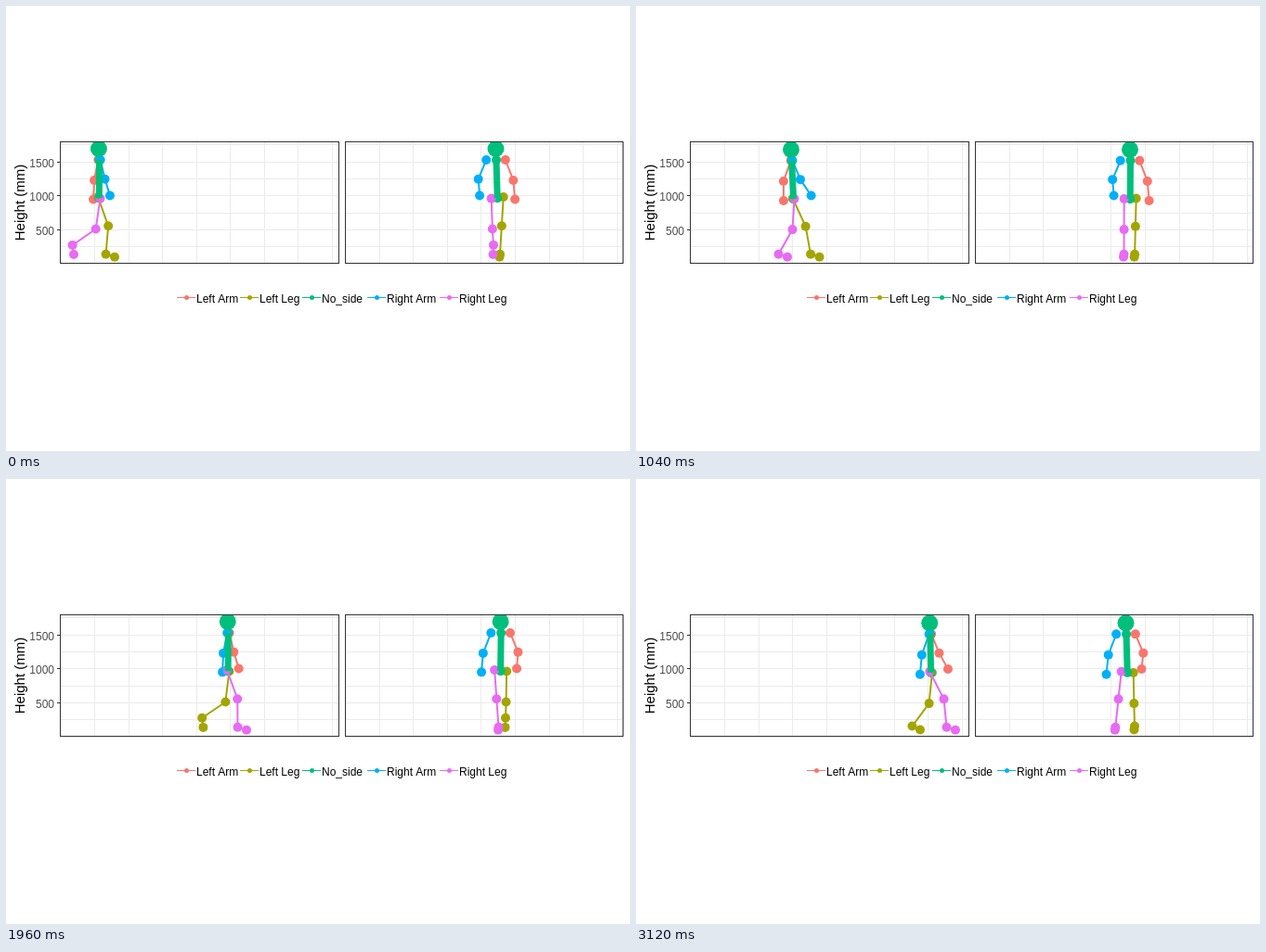
Recreate the animation shown at these times as an HTML page with a canvas. Size 672 px wide and 480 px high, loop 3140 ms.

```html
<!DOCTYPE html>
<html>
<head>
<meta charset="utf-8">
<style>
html, body { margin: 0; width: 100%; height: 100%; overflow: hidden; background: #fff; }
canvas { display: block; }
</style>
</head>
<body>
<canvas id="stage" width="672" height="480"></canvas>
<script>
const ctx = document.getElementById('stage').getContext('2d');
const LOOP = 3140, STEP = 20, STRIDE = 1305, TAU = 2 * Math.PI;
const THIGH = 33.2, SHANK = 30.5;
const RED = '#F8766D', OLIVE = '#A3A500', GREEN = '#00BF7D', BLUE = '#00B0F6', PINK = '#E76BF3';

// Successive footfalls of each foot: [side x, front x].
const FOOTFALLS = {
  left: [[25, 532], [117, 532], [212, 538], [306, 537]],
  right: [[73, 525], [163, 525.5], [259, 530.5], [346, 516]]
};

const wave = (phase, peak = 0) => Math.cos(TAU * (phase - peak));
const mix = (a, b, u) => a + (b - a) * u;

function line(points, color, width) {
  ctx.strokeStyle = color;
  ctx.lineWidth = width;
  ctx.beginPath();
  points.forEach(([x, y]) => ctx.lineTo(x, y));
  ctx.stroke();
}

function dot([x, y], r, color) {
  ctx.fillStyle = color;
  ctx.beginPath();
  ctx.arc(x, y, r, 0, TAU);
  ctx.fill();
}

function text(str, x, y, color = '#000', align = 'left', size = 12) {
  ctx.font = size + 'px "Liberation Sans", Arial, sans-serif';
  ctx.fillStyle = color;
  ctx.textAlign = align;
  ctx.fillText(str, x, y);
}

// Steady walk with a slow drift, two bobs per stride and a slight twist.
function trunk(t) {
  const phase = t / STRIDE, drift = TAU * t / LOOP;
  const hip = 100.3 + .0696 * t - 3.5 * Math.sin(drift);
  return {
    hip,
    head: hip - 1.6 + 1.2 * wave(2 * phase),
    hipFront: 531.2 - 2 * Math.cos(drift),
    headFront: 530.5 - 3 * Math.cos(drift),
    drop: 1 - 1.4 * wave(2 * phase, .25),
    twist: 1.3 * wave(phase, .43)
  };
}

// Knee between hip and ankle, bent forwards.
function bend([hx, hy], [ax, ay]) {
  const dx = ax - hx, dy = ay - hy, d = Math.hypot(dx, dy);
  const along = (d * d + THIGH ** 2 - SHANK ** 2) / (2 * d);
  const out = Math.sqrt(Math.max(0, THIGH ** 2 - along ** 2));
  return [hx + (dx * along + dy * out) / d, hy + (dy * along - dx * out) / d];
}

// Joints of one side as [side x, front x, y]; each stride starts at toe-off.
function limbs(t, side) {
  const { hip, head, hipFront, headFront, drop, twist } = trunk(t);
  const left = side === 'left', dir = left ? 1 : -1;
  const phase = t / STRIDE - (left ? .5 : 0);
  const turn = Math.floor(phase), p = phase - turn;

  const shoulder = head + .6 + dir * twist;
  const handDx = 4.5 + 14.5 * wave(p, .84) - 2 * wave(2 * p);
  const arm = [
    [shoulder, headFront + dir * 10.3, 165 + drop],
    [shoulder + .3 + 8.5 * wave(p, .84), headFront + dir * 18.8, 186.3 + drop - wave(p, .86)],
    [shoulder + handDx, headFront + dir * (19 - 2 * wave(p, .9)), 205.5 + drop - 3 * wave(p, .86)]
  ];

  const i = turn + (left ? 1 : 0), from = FOOTFALLS[side][i], to = FOOTFALLS[side][i + 1];
  const swing = Math.sin(Math.PI / 2 * Math.min(1, p / .45)) ** 1.1;
  const heelLift = Math.exp(-((((p + .455) % 1 - .5) / .1) ** 2));
  const toeX = mix(from[0], to[0], swing), footFront = mix(from[1], to[1], swing);
  const ankle = [toeX - 9.5 + 10 * heelLift, 267.7 - 12 * heelLift];
  const joint = [hip + dir * twist, 205.6 + 1.2 * drop + .8 * wave(p)];
  const knee = bend(joint, ankle), jointFront = hipFront + dir * 6.5;
  return {
    arm,
    leg: [
      [joint[0], jointFront, joint[1]],
      [knee[0], (jointFront + footFront) / 2, knee[1]],
      [ankle[0], footFront, ankle[1]],
      [toeX, footFront - .5, 270.8 - 3.5 * heelLift]
    ]
  };
}

function figure(t, front) {
  const { hip, head, hipFront, headFront, drop } = trunk(t);
  const view = joints => joints.map(([s, f, y]) => [front ? f : s, y]);
  const left = limbs(t, 'left'), right = limbs(t, 'right');
  const [skull, ...torso] = view([
    [head, headFront, 153 + drop],
    [head + .6, headFront + .5, 165 + drop],
    [hip, hipFront, 206 + 1.2 * drop]
  ]);
  const parts = [
    [view(left.arm), RED, 2], [view(left.leg), OLIVE, 2], [torso, GREEN, 7],
    [view(right.arm), BLUE, 2], [view(right.leg), PINK, 2]
  ];
  parts.forEach(([joints, color]) => joints.forEach(p => dot(p, 5, color)));
  dot(skull, 9, GREEN);
  parts.filter(p => p[0] !== torso).forEach(p => line(...p));
  line(torso, GREEN, 7);
}

function panel(origin, width, t, front) {
  const x = Math.floor(origin);
  ctx.save();
  ctx.beginPath();
  ctx.rect(x, 147, width, 130);
  ctx.clip();
  for (let i = 1; i < 9; i++) {
    const gx = Math.round(origin + 36.57 * i) + .5;
    line([[gx, 147], [gx, 277]], '#EBEBEB', 1);
  }
  for (let i = 0; i < 7; i++) {
    const gy = Math.floor(149.9 + 18.3 * i) + .5;
    line([[x, gy], [x + width, gy]], '#EBEBEB', 1);
  }
  figure(t, front);
  ctx.restore();
  ctx.strokeStyle = '#333';
  ctx.lineWidth = 1;
  ctx.strokeRect(x + .5, 146.5, width, 131);
}

function draw(now) {
  const t = Math.floor(now % LOOP / STEP) * STEP;
  ctx.fillStyle = '#fff';
  ctx.fillRect(0, 0, 672, 480);
  panel(58.5, 300, t, false);
  panel(365.1, 299, t, true);

  [1500, 1000, 500].forEach((value, i) => {
    const y = Math.floor(168.2 + 36.6 * i);
    line([[55, y + .5], [58, y + .5]], '#333', 1);
    text(value, 52, y + 6, '#4D4D4D', 'right');
  });
  ctx.save();
  ctx.translate(20, 212);
  ctx.rotate(-Math.PI / 2);
  text('Height (mm)', 0, 0, '#000', 'center', 15);
  ctx.restore();

  [['Left Arm', RED, 194], ['Left Leg', OLIVE, 262], ['No_side', GREEN, 329],
    ['Right Arm', BLUE, 399], ['Right Leg', PINK, 477]].forEach(([label, color, x]) => {
    line([[x - 10, 314.5], [x + 10, 314.5]], color, 1);
    dot([x + .5, 314.5], 2.5, color);
    text(label, x + 11, 320);
  });
}

const start = performance.now();
function tick() {
  draw(performance.now() - start);
  requestAnimationFrame(tick);
}
tick();
</script>
</body>
</html>
```
